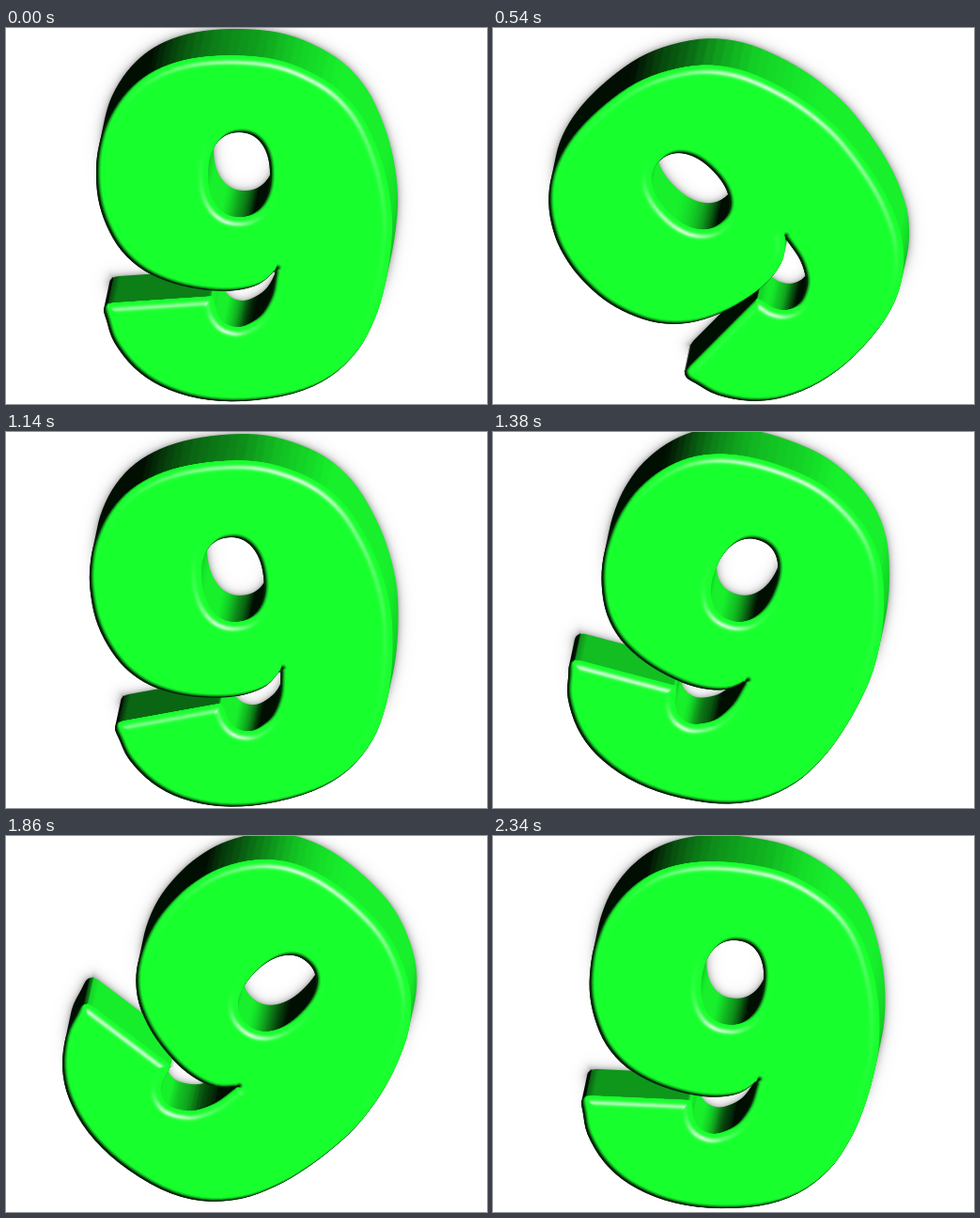
An HTML page with a canvas for the animation above (2400 ms loop, 512x400 px).

```html
<!DOCTYPE html>
<html lang="en">
<head>
<meta charset="utf-8">
<title>Rocking nine</title>
<style>
  html, body { margin: 0; width: 512px; height: 400px; overflow: hidden; background: #fff; }
  canvas { display: block; }
</style>
</head>
<body>
<canvas id="stage" width="512" height="400"></canvas>
<script>
const W = 512, H = 400, LOOP = 2400, STEP = 60;
const SWING = 43 * Math.PI / 180;
const PIVOT = { x: 253, y: 211 }, TILT = 0.95;
const DEPTH = { x: 6, y: -28 };
const FACE = [24, 255, 46];
const LIGHT = { x: 0.6, y: -0.38, z: 0.7 };
const BEVEL = 14;

// Outer contour; a repeated point makes a corner
const OUTER = [
  287,257, 287,257, 286,264, 282,285, 272,304, 259,314, 246,318, 233,314, 225,304, 222,292,
  219,285, 219,285, 114,292, 114,292, 107,294, 104,300, 107,311,
  115,334, 136,361, 165,381, 205,394, 252,397, 305,389, 345,371, 375,342, 393,308,
  403,275, 409,240, 411,205, 406,165, 395,128, 378,93, 353,65, 320,45, 285,33, 245,29,
  205,31, 172,39, 145,53, 123,74, 107,100, 99,125, 96,150, 98,181, 107,210, 123,237,
  147,258, 179,272, 215,279, 245,279, 270,272
];

const clamp = (v, lo, hi) => v < lo ? lo : v > hi ? hi : v;
const toLocal = (x, y) => [x - PIVOT.x, (y - PIVOT.y) / TILT];

function smoothLoop(flat) {
  const n = flat.length / 2, out = [];
  const at = (i, k) => flat[((i + n) % n) * 2 + k];
  for (let i = 0; i < n; i++) {
    for (let s = 0; s < 4; s++) {
      const t = s / 4;
      const mix = k => {
        const a = at(i - 1, k), b = at(i, k), c = at(i + 1, k), d = at(i + 2, k);
        return b + 0.5 * t * (c - a + t * (2 * a - 5 * b + 4 * c - d + t * (3 * (b - c) + d - a)));
      };
      out.push(toLocal(mix(0), mix(1)));
    }
  }
  return out;
}

function holeLoop() {
  const out = [], bend = (v, r) => Math.sign(v) * Math.pow(Math.abs(v), 0.9) * r;
  for (let i = 0; i < 64; i++) {
    const a = i * Math.PI / 32;
    out.push(toLocal(248 + bend(Math.cos(a), 33), 156 + bend(Math.sin(a), 45)));
  }
  return out;
}

// Signed distance grid, negative inside
const CELL = 2, HALF = 230, N = HALF * 2 / CELL + 1;
const field = new Float32Array(N * N);

function buildField() {
  const segs = [];
  for (const loop of [smoothLoop(OUTER), holeLoop()]) {
    loop.forEach((p, i) => {
      const q = loop[(i + 1) % loop.length];
      const dx = q[0] - p[0], dy = q[1] - p[1], len = dx * dx + dy * dy;
      if (len > 1e-6) segs.push({ x: p[0], y: p[1], dx, dy, len });
    });
  }
  for (let j = 0; j < N; j++) {
    for (let i = 0; i < N; i++) {
      const x = i * CELL - HALF, y = j * CELL - HALF;
      let best = 1e9, inside = false;
      for (const s of segs) {
        const px = x - s.x, py = y - s.y;
        const t = clamp((px * s.dx + py * s.dy) / s.len, 0, 1);
        const ex = px - t * s.dx, ey = py - t * s.dy, d = ex * ex + ey * ey;
        if (d < best) best = d;
        if ((py < 0) !== (py < s.dy) && px < py * s.dx / s.dy) inside = !inside;
      }
      field[j * N + i] = Math.sqrt(best) * (inside ? -1 : 1);
    }
  }
}

function dist(x, y) {
  const u = clamp((x + HALF) / CELL, 0, N - 1.01), v = clamp((y + HALF) / CELL, 0, N - 1.01);
  const i = u | 0, j = v | 0, fu = u - i, fv = v - j, k = j * N + i;
  const top = field[k] + (field[k + 1] - field[k]) * fu;
  const low = field[k + N] + (field[k + N + 1] - field[k + N]) * fu;
  return top + (low - top) * fv;
}

function render(angle) {
  const img = new ImageData(W, H), px = img.data;
  const c = Math.cos(angle), s = Math.sin(angle);
  let lx, ly;
  const place = (x, y, z) => {
    const [qx, qy] = toLocal(x - DEPTH.x * z, y - DEPTH.y * z);
    lx = qx * c + qy * s;
    ly = qy * c - qx * s;
    return dist(lx, ly);
  };
  const normal = () => {
    const gx = dist(lx + 1.5, ly) - dist(lx - 1.5, ly);
    const gy = dist(lx, ly + 1.5) - dist(lx, ly - 1.5);
    const len = Math.hypot(gx, gy) || 1;
    return [(gx * c - gy * s) / len, (gx * s + gy * c) / len];
  };

  const faceColor = d => {
    const inset = Math.max(0, -d);
    if (inset >= BEVEL) return FACE;
    const [nx, ny] = normal();
    const m = (1 - inset / BEVEL) ** 3, nz = Math.sqrt(1 - m * m);
    const lit = clamp(1.8 * (LIGHT.z * nz + m * (LIGHT.x * nx + LIGHT.y * ny)), 0.15, 1);
    let turn = Math.abs(Math.atan2(nx, -ny) * 180 / Math.PI - 25);
    if (turn > 180) turn = 360 - turn;
    const shine = 0.8 * Math.exp(-((turn / 45) ** 2) - ((inset - 8) / 2.6) ** 2);
    return FACE.map(v => v * lit + (255 - v * lit) * shine);
  };

  const wallColor = () => {
    const [nx, ny] = normal();
    const lit = clamp(0.06 + 1.3 * (LIGHT.x * nx + LIGHT.y * ny), 0.06, 0.94);
    return FACE.map(v => v * lit);
  };

  const behind = (x, y) => {
    let near = 1e9, nearZ = 0, z = 0, hit = false;
    while (true) {
      const d = place(x, y, z);
      if (d < near) { near = d; nearZ = z; }
      if (d < -0.5) { hit = true; break; }
      if (z >= 1) break;
      z = Math.min(1, z + Math.max(d, 0.5) / 31);
    }
    if (hit) return wallColor();
    const shade = 255 - 75 * Math.exp(-Math.max(0, place(x, y, 1)) / 4);
    const cover = clamp(0.5 - near, 0, 1);
    if (!cover) return [shade, shade, shade];
    place(x, y, nearZ);
    return wallColor().map(v => v * cover + shade * (1 - cover));
  };

  for (let y = 0, o = 0; y < H; y++) {
    for (let x = 0; x < W; x++, o += 4) {
      const d = place(x + 0.5, y + 0.5, 0);
      const cover = clamp(0.5 - d, 0, 1);
      let rgb;
      if (cover === 1) rgb = faceColor(d);
      else if (d > 70) rgb = [255, 255, 255];
      else {
        const front = cover ? faceColor(d) : FACE;
        rgb = behind(x + 0.5, y + 0.5);
        if (cover) rgb = rgb.map((v, i) => v + (front[i] - v) * cover);
      }
      px[o] = rgb[0]; px[o + 1] = rgb[1]; px[o + 2] = rgb[2]; px[o + 3] = 255;
    }
  }
  return img;
}

const ctx = document.getElementById('stage').getContext('2d');
const cache = [];
let shown = -1;

function draw() {
  const n = Math.floor((performance.now() % LOOP) / STEP);
  if (n !== shown) {
    cache[n] = cache[n] || render(-SWING * Math.sin(2 * Math.PI * n * STEP / LOOP));
    ctx.putImageData(cache[n], 0, 0);
    shown = n;
  }
  requestAnimationFrame(draw);
}

buildField();
draw();
</script>
</body>
</html>
```
